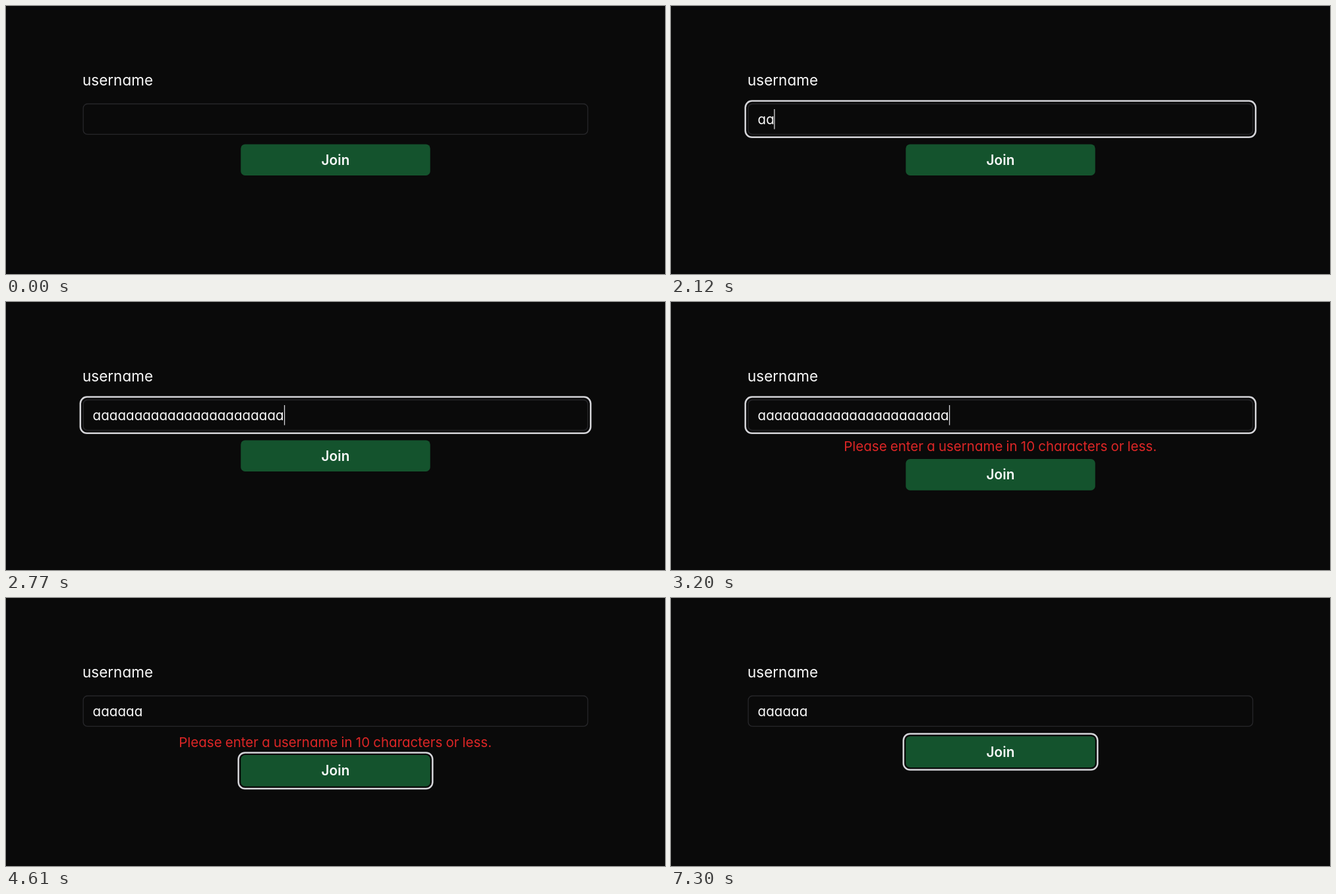
Recreate the animation shown at these times as an HTML page. Size 1000 px wide and 408 px high, loop 7320 ms.

```html
<!DOCTYPE html>
<html lang="en">
<head>
<meta charset="utf-8">
<title>Join form</title>
<style>
  html, body { margin: 0; width: 100%; height: 100%; overflow: hidden; background: #0a0a0a; }
  svg { display: block; width: 100%; height: 100%; }
  text {
    font: 400 20.6px Inter, "Open Sans", sans-serif;
    font-feature-settings: "cv11";
    fill: #fafafa;
  }
  .label { font-size: 22.5px; }
  .field { fill: none; stroke: #27272a; stroke-width: 1.3; }
  .ring { fill: none; stroke: #d4d4d8; stroke-width: 2.5; }
  .error { fill: #dc2626; font-size: 20.5px; word-spacing: -.6px; text-anchor: middle; }
  .action { font-size: 20.8px; font-weight: 600; text-anchor: middle; }
</style>
</head>
<body>
<svg viewBox="0 0 1000 408">
  <text class="label" x="116" y="120.5">username</text>
  <rect class="field" x="117.2" y="149" width="765.6" height="46.4" rx="6.5"/>
  <rect class="ring" id="fieldRing" x="112.8" y="144.6" width="774.4" height="55.2" rx="10"/>
  <text id="value" x="131.6" y="180"></text>
  <rect id="caret" y="157" width="1.3" height="30.5" fill="#d4d4d8"/>
  <text class="error" id="error" x="499.7" y="227">Please enter a username in 10 characters or less.</text>
  <g id="button">
    <rect x="356.3" y="210.4" width="287.4" height="47.6" rx="6.5" fill="#14532d"/>
    <rect class="ring" id="buttonRing" x="352.7" y="206.8" width="294.6" height="54.8" rx="10"/>
    <text class="action" id="action" x="500" y="241.6">Join</text>
  </g>
</svg>
<script>
  const LOOP = 7320, PITCH = 12.65;
  const $ = id => document.getElementById(id);
  const show = (id, on) => $(id).setAttribute("visibility", on ? "visible" : "hidden");
  const within = (t, from, to) => t >= from && t < to;

  // Number of letters in the field: held key, then held backspace.
  function letters(t) {
    if (t < 1880) return 0;
    if (t < 2120) return 1;
    if (t < 3560) return Math.min(23, 2 + Math.floor((t - 2120) * 21 / 650 + 1e-6));
    if (t < 3750) return 22;
    if (t < 3820) return 21;
    if (t < 3850) return 20;
    const step = Math.min(11, Math.floor((t - 3850) / 30));
    return Math.round(19 - 13 * step / 11);
  }

  function draw(t) {
    const n = letters(t);
    const failed = within(t, 3200, 5340);
    const blink = within(t, 1860, 1880) || within(t, 3260, 3560);

    $("value").textContent = "a".repeat(n);
    $("caret").setAttribute("x", 131.6 + PITCH * n - .6);
    show("caret", within(t, 1370, 4610) && !blink);
    show("fieldRing", within(t, 1370, 4610));
    show("buttonRing", t >= 4610);
    show("error", failed);
    $("button").setAttribute("transform", `translate(0 ${failed ? 28.7 : 0})`);
    $("action").textContent = within(t, 5370, 7300) ? "Sending..." : "Join";
  }

  const start = performance.now();
  function tick() {
    draw((performance.now() - start) % LOOP);
    requestAnimationFrame(tick);
  }
  tick();
</script>
</body>
</html>
```
